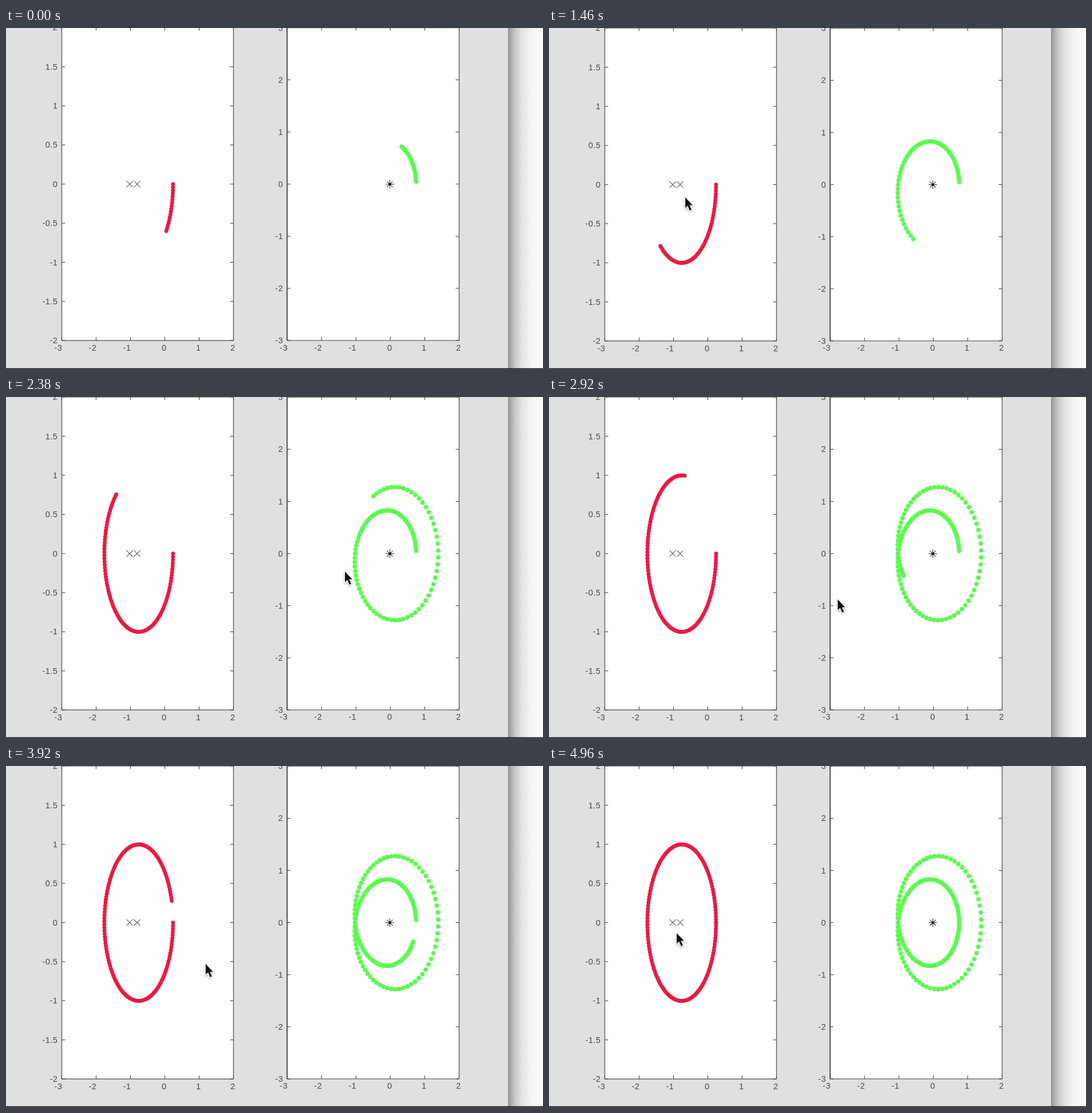
Animation, 938 px wide and 596 px high, one loop 5000 ms. Source, as an HTML page with a canvas:

```html
<!DOCTYPE html>
<html lang="en">
<head>
<meta charset="utf-8">
<title>Conformal map of a circle</title>
<style>
html, body { margin: 0; width: 100%; height: 100%; overflow: hidden; background: #e0dfe2; }
canvas { display: block; filter: blur(0.5px); }
</style>
</head>
<body>
<canvas id="stage" width="938" height="596"></canvas>
<script>
const ctx = document.getElementById('stage').getContext('2d');
const LOOP = 5000, ANGLE_STEP = 0.04;

const left = { x0: 277.4, y0: 273.6, sx: 60, sy: 136.7, yMax: 2, yStep: 0.5, axis: '#666' };
const right = { x0: 671.3, y0: 273.6, sx: 60.1, sy: 91.1, yMax: 3, yStep: 1, axis: '#222' };

// Keys are [time, ...values]
const angleKeys = [[0, 36.8], [700, 42], [880, 51], [1460, 128.5], [1900, 181],
  [2380, 230], [2960, 280.5], [3540, 322], [4180, 360], [LOOP, 360]];
const driftKeys = [[0, 0, -0.8], [80, 0, -0.8], [880, 0.6, 0.7], [1200, 0, 0], [LOOP, 0, 0]];
const cursorKeys = [[1250, 238, 296], [1500, 238, 296], [2250, 592, 305], [2450, 592, 305],
  [3480, 391, 417], [3600, 391, 417], [4330, 288, 244], [4900, 223, 292], [LOOP, 223, 292]];

const linear = u => u;
const smooth = u => u * u * (3 - 2 * u);

function sample(keys, t, ease = linear) {
  const i = Math.max(1, keys.findIndex(k => k[0] > t));
  const [a, b] = [keys[i - 1], keys[i]];
  const u = ease((t - a[0]) / (b[0] - a[0]));
  return a.slice(1).map((v, j) => v + (b[j + 1] - v) * u);
}

function circlePoint(k) {
  const a = k * ANGLE_STEP;
  return [-0.75 + Math.cos(a), -Math.sin(a)];
}

// w = 1 / ((z + 1)(z + 0.8))
function mapPoint([x, y]) {
  const re = (x + 1) * (x + 0.8) - y * y, im = y * (2 * x + 1.8);
  const n = re * re + im * im;
  return [re / n, -im / n];
}

function line(x1, y1, x2, y2, color = '#444', width = 1.1) {
  ctx.strokeStyle = color;
  ctx.lineWidth = width;
  ctx.beginPath();
  ctx.moveTo(x1, y1);
  ctx.lineTo(x2, y2);
  ctx.stroke();
}

function drawAxes(p) {
  const px = x => p.x0 + x * p.sx, py = y => p.y0 - y * p.sy;
  const l = px(-3), r = px(2), top = py(p.yMax), bottom = py(-p.yMax);
  ctx.fillStyle = '#fff';
  ctx.fillRect(l, top, r - l, bottom - top);
  line(l, top, r, top, '#666', 1.3);
  line(r, top, r, bottom, '#555', 1.3);
  line(l, bottom, r, bottom, '#666', 1.4);
  line(l, top, l, bottom, p.axis, 1.5);

  ctx.fillStyle = '#484848';
  ctx.font = '14.5px "Liberation Sans", Arial, sans-serif';
  ctx.letterSpacing = '0.5px';
  ctx.textAlign = 'center';
  for (let x = -3; x <= 2; x++) {
    line(px(x), bottom, px(x), bottom - 6);
    line(px(x), top, px(x), top + 5);
    ctx.fillText(x, px(x) - (x < 0 ? 6 : 1), bottom + 17.5);
  }
  ctx.textAlign = 'right';
  for (let y = -p.yMax; y <= p.yMax; y += p.yStep) {
    line(l, py(y), l + 6, py(y));
    line(r, py(y), r - 6, py(y));
    ctx.fillText(y, l - 7, py(y) + 5);
  }
}

function drawDots(p, first, last, point, color, radius) {
  ctx.fillStyle = color;
  for (let k = first; k <= last; k++) {
    const [x, y] = point(k);
    ctx.beginPath();
    ctx.arc(p.x0 - 0.6 + x * p.sx, p.y0 + 0.2 - y * p.sy, radius, 0, 2 * Math.PI);
    ctx.fill();
  }
}

function drawCross(x, y, r, color) {
  line(x - r, y - r, x + r, y + r, color);
  line(x - r, y + r, x + r, y - r, color);
}

function drawMarkers() {
  drawCross(216, 273.6, 5.5, '#556');
  drawCross(229, 273.6, 5.5, '#556');
  const x = 670.5, y = 273.8;
  drawCross(x, y, 5.2, '#444');
  line(x - 7.5, y, x + 7.5, y, '#333');
  line(x, y - 7.5, x, y + 7.5, '#333');
  ctx.fillStyle = '#111';
  ctx.fillRect(x - 2, y - 2, 4, 4);
}

function drawBackdrop() {
  ctx.fillStyle = '#e0dfe2';
  ctx.fillRect(0, 0, 938, 596);
  const shadow = ctx.createLinearGradient(877, 0, 938, 0);
  [[0, '#909090'], [0.08, '#acacac'], [0.22, '#cbcbcc'], [0.4, '#e4e4e5'], [0.65, '#f4f4f5'], [1, '#fcfcfc']]
    .forEach(stop => shadow.addColorStop(...stop));
  ctx.fillStyle = shadow;
  ctx.fillRect(877, 0, 61, 596);
}

function drawCursor(x, y) {
  ctx.save();
  ctx.translate(x, y);
  ctx.shadowColor = 'rgba(0,0,0,.35)';
  ctx.shadowBlur = 4;
  ctx.shadowOffsetY = 2;
  const arrow = new Path2D('M0 0V18.5L4.2 14.8L7.8 23L11 21.5L7.4 13.6H12.8Z');
  ctx.strokeStyle = '#fff';
  ctx.lineWidth = 2;
  ctx.stroke(arrow);
  ctx.shadowColor = 'transparent';
  ctx.fillStyle = '#111';
  ctx.fill(arrow);
  ctx.restore();
}

function draw(t) {
  drawBackdrop();
  const angle = sample(angleKeys, t)[0] * Math.PI / 180;
  const last = Math.floor(angle / ANGLE_STEP);
  ctx.save();
  ctx.translate(...sample(driftKeys, t));
  drawAxes(left);
  drawAxes(right);
  drawMarkers();
  drawDots(left, 0, last, circlePoint, '#e91b42', 3.5);
  const image = k => mapPoint(circlePoint(k));
  drawDots(right, 1, last, image, 'rgba(93,250,80,.15)', 4.8);
  drawDots(right, 1, last, image, '#5cfa4e', 3.8);
  ctx.restore();
  if (t >= cursorKeys[0][0]) drawCursor(...sample(cursorKeys, t, smooth));
  ctx.fillStyle = '#111';
  ctx.fillRect(0, 594.7, 938, 1.3);
}

function tick() {
  draw(performance.now() % LOOP);
  requestAnimationFrame(tick);
}
tick();
</script>
</body>
</html>
```
